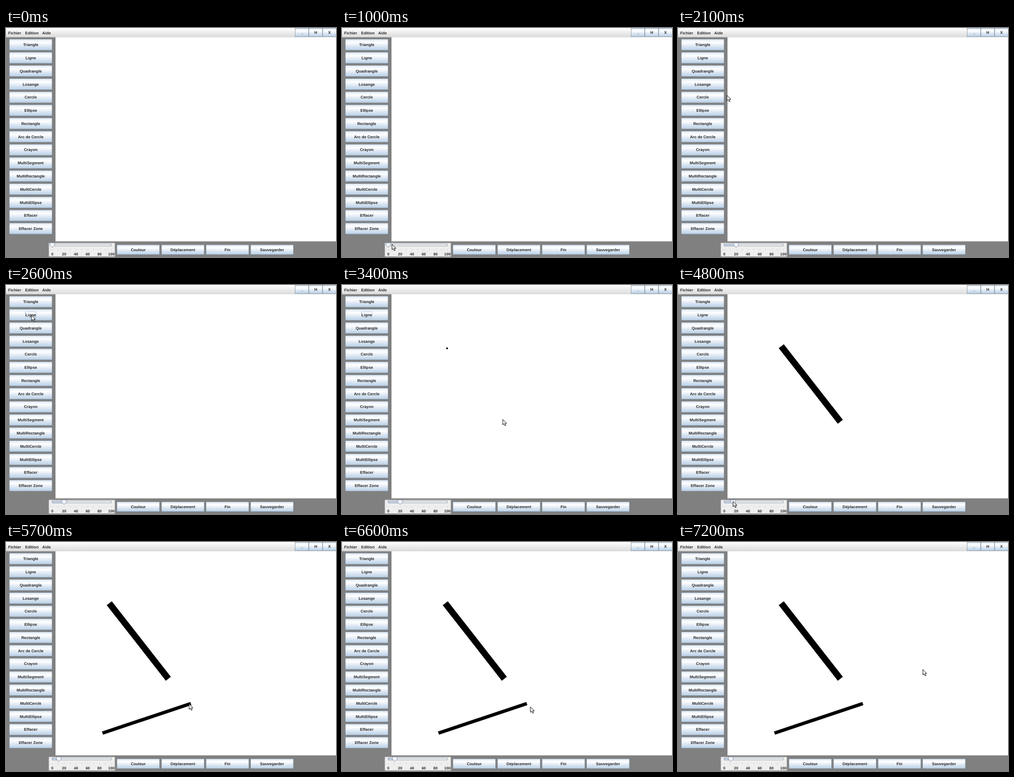
These frames come from a looping animation (620x432 px, 7.3 s). An HTML page:

```html
<!DOCTYPE html>
<html lang="fr">
<head>
<meta charset="utf-8">
<title>Dessin</title>
<style>
  html, body { margin: 0; width: 100%; height: 100%; overflow: hidden; background: #808080; }
  svg { display: block; width: 620px; height: 432px; }
  text {
    font: bold 7.45px "Liberation Sans", Arial, sans-serif;
    fill: #2b2b2b;
    text-rendering: geometricPrecision;
  }
  .mid { text-anchor: middle; }
  .small { font-size: 7.1px; }
</style>
</head>
<body>
<svg viewBox="0 0 620 432">
  <defs>
    <linearGradient id="metal" x2="0" y2="1">
      <stop offset="0" stop-color="#dde8f3"/>
      <stop offset=".3" stop-color="#fff"/>
      <stop offset=".6" stop-color="#dfe9f4"/>
      <stop offset="1" stop-color="#b8cfe5"/>
    </linearGradient>
    <linearGradient id="bar" x2="0" y2="1">
      <stop offset="0" stop-color="#fff"/>
      <stop offset="1" stop-color="#dadada"/>
    </linearGradient>
  </defs>
  <rect width="620" height="432" fill="#808080"/>
  <rect x="93" y="17" width="527" height="385.5" fill="#fff"/>
  <rect width="620" height="17.5" fill="url(#bar)"/>
  <rect x="80.5" y="405.5" width="124" height="25.5" fill="#eee"/>
  <g id="ui"></g>
  <rect id="focus" x="36.5" y="50.5" width="20" height="11" fill="none" stroke="#b4c6dd" stroke-width=".8"/>
  <rect x="87" y="407.5" width="111" height="3.5" fill="#f4f4f4" stroke="#8a97a5" stroke-width=".8"/>
  <rect id="fill" x="87" y="407.5" height="3.5" fill="#cedaea" stroke="#8799b5" stroke-width=".8"/>
  <path id="thumb" d="M-4.5 405.3H4.5V409.8L0 414L-4.5 409.8Z" fill="#f2f6fa" stroke="#71839a" stroke-width=".8"/>
  <g stroke="#000">
    <path id="line1" d="M194 115.5L305 258" stroke-width="12"/>
    <path id="line2" d="M181.3 360.5L347.3 304.8" stroke-width="6.4"/>
  </g>
  <rect id="dot1" x="196" y="118" width="3" height="3"/>
  <rect id="dot2" x="183" y="358" width="3" height="3"/>
  <path id="cursor" d="M0 0V10.2L2.4 8.1L4.1 12L5.9 11.2L4.3 7.5H7.3Z" fill="#fff" stroke="#000" stroke-width=".9"/>
</svg>
<script>
const LOOP = 7300, STEP = 100, TRAVEL = 300;
const $ = id => document.getElementById(id);
const ui = $("ui");

function add(name, attrs, text = "") {
  const el = document.createElementNS(ui.namespaceURI, name);
  for (const key in attrs) el.setAttribute(key, attrs[key]);
  el.textContent = text;
  ui.append(el);
}

function label(text, x, y, cls = "") {
  add("text", { x, y, class: cls }, text);
}

function button(text, x, y, width, height) {
  add("rect", { x, y, width, height, fill: "url(#metal)", stroke: "#7a8a99", "stroke-width": 0.7 });
  label(text, x + width / 2, y + height / 2 + 2.7, "mid");
}

const tools = ["Triangle", "Ligne", "Quadrangle", "Losange", "Cercle", "Ellipse", "Rectangle",
  "Arc de Cercle", "Crayon", "MultiSegment", "MultiRectangle", "MultiCercle", "MultiEllipse",
  "Effacer", "Effacer Zone"];
tools.forEach((name, i) => button(name, 6.2, 21 + i * 24.78, 80.5, 21));
["Couleur", "Déplacement", "Fin", "Sauvegarder"]
  .forEach((name, i) => button(name, 208.3 + i * 83.8, 409, 80.3, 18.4));
["_", "H", "X"].forEach((name, i) => button(name, 543.2 + i * 25.9, 0.4, 25.5, 15.8));
["Fichier", "Edition", "Aide"].forEach((name, i) => label(name, 4 + i * 32, 11.5));

const tickX = v => 87 + v * 1.11;
for (let v = 0; v <= 100; v += 10) {
  add("path", { d: `M${tickX(v)} 417v2.5`, stroke: "#b4b8bd", "stroke-width": 0.6 });
  if (v % 20 === 0) label(v, tickX(v), 429, "mid small");
}

// Places the mouse visits: arrival time, x, y
const slot = [109, 408], ligne = [48, 57];
const mouse = [
  [500, 250, 330], [900, 94, 408], [1500, ...slot], [2100, 92, 127], [2400, ...ligne],
  [3100, 197, 119], [3400, 302, 253.5], [4100, 165, 385], [4500, ...slot], [5000, 99, 408],
  [5200, ...ligne], [5400, 184, 359], [5700, 344, 305.5], [6300, 354, 311], [6900, 428, 311],
  [7200, 460, 240.5]
];
const slider = [[0, tickX(0)], [1500, tickX(20)], [5000, tickX(11)]];

// Rest at each stop, then ease out towards the next one
function at(stops, t) {
  const i = Math.max(0, stops.findLastIndex(s => s[0] <= t));
  const [from, ...a] = stops[i];
  const [to, ...b] = stops[i + 1] || stops[i];
  const begin = Math.max(from, to - TRAVEL);
  const p = t > begin && to > begin ? (t - begin) / (to - begin) : 0;
  return a.map((v, k) => v + (b[k] - v) * (1 - (1 - p) ** 2));
}

function show(id, from, to, t) {
  $(id).setAttribute("visibility", t >= from && t < to ? "visible" : "hidden");
}

function draw(t) {
  const [x, y] = at(mouse, t), [pos] = at(slider, t);
  $("cursor").setAttribute("transform", `translate(${x} ${y})`);
  $("thumb").setAttribute("transform", `translate(${pos} 0)`);
  $("fill").setAttribute("width", pos - tickX(0));
  show("cursor", 500, LOOP, t);
  show("fill", 1300, LOOP, t);
  show("focus", 2500, 4500, t);
  show("dot1", 3200, 3500, t);
  show("line1", 3500, LOOP, t);
  show("dot2", 5400, 5700, t);
  show("line2", 5700, LOOP, t);
}

const start = performance.now();
function frame(now) {
  const t = Math.max(0, now - start) % LOOP;
  draw(Math.floor(t / STEP) * STEP);
  requestAnimationFrame(frame);
}
draw(0);
requestAnimationFrame(frame);
</script>
</body>
</html>
```
